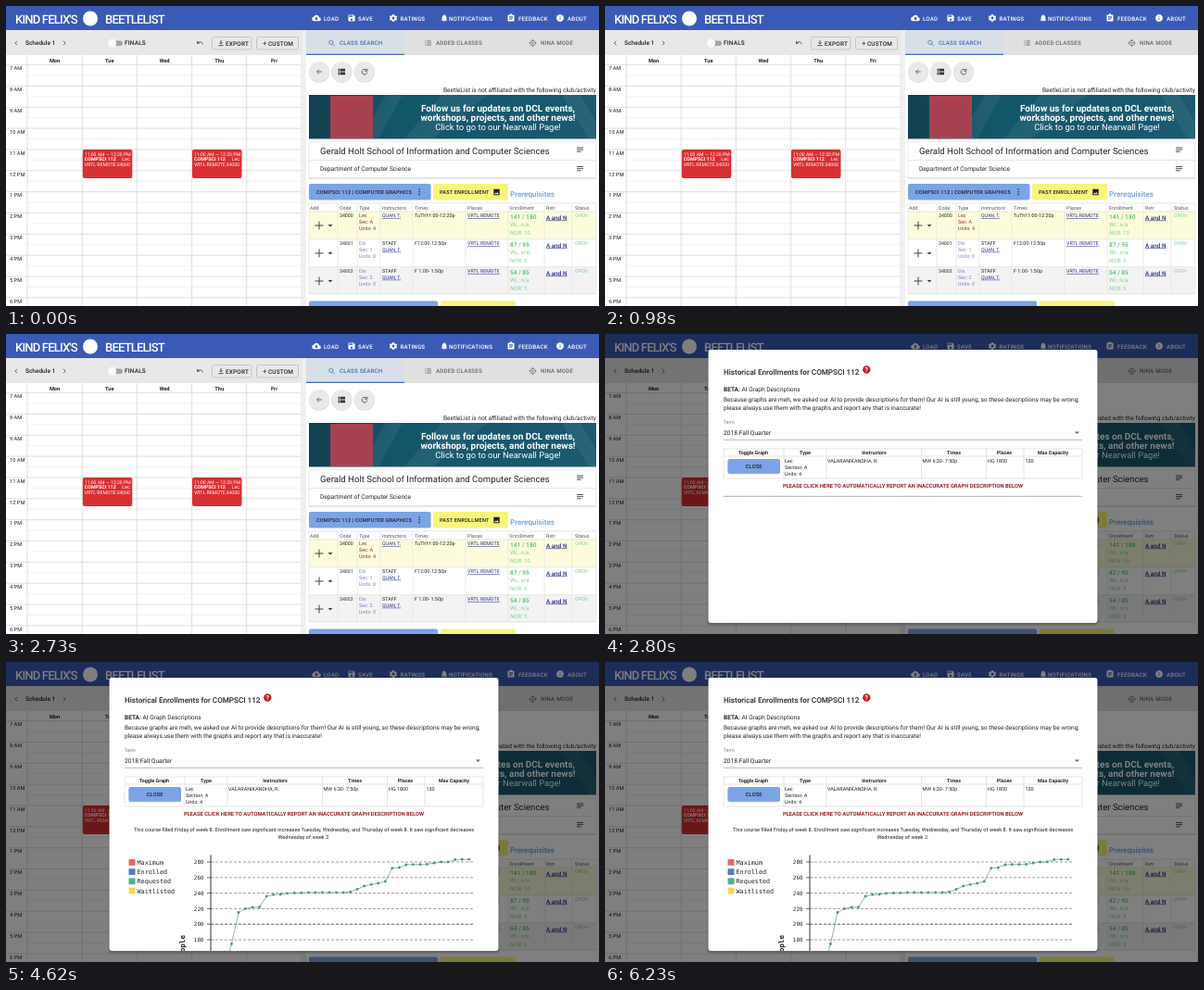
An HTML page for the animation above (6.3 s loop, 640 by 324 pixels).

```html
<!DOCTYPE html>
<html lang="en">
<head>
<meta charset="utf-8">
<title>Course planner</title>
<style>
  html, body { margin: 0; width: 100%; height: 100%; overflow: hidden; background: #fff; }
  svg { display: block; width: 640px; height: 324px; }
  text { font-family: Roboto, sans-serif; text-rendering: geometricPrecision; white-space: pre; }
  .mono { font-family: "DejaVu Sans Mono", monospace; }
  .caps { font-weight: 500; letter-spacing: .02857em; }
  .med { font-weight: 500; }
  .bold { font-weight: 700; }
  .link { text-decoration: underline; }
  .mid { text-anchor: middle; }
  .end { text-anchor: end; }
</style>
</head>
<body>
<svg id="stage" viewBox="0 0 640 324"></svg>
<script>
const INK = '#222', BLUE = '#7ba3e7', YELLOW = '#f8f57c', GREEN = '#7dd38d';
// The page cuts to the dialog, then the request ends and the chart replaces the rule
const LOOP = 6300, OPEN = 2790, STATUS_ON = 3000, CHART = 3560, STATUS_OFF = 3740;

const text = (x, y, s, size, fill = INK, cls = '') =>
  `<text x="${x}" y="${y}" font-size="${size}" fill="${fill}" class="${cls}">${s}</text>`;
const box = (x, y, w, h, fill, extra = '') =>
  `<rect x="${x}" y="${y}" width="${w}" height="${h}" fill="${fill}" ${extra}/>`;
const line = (x1, y1, x2, y2, color, w = 1, extra = '') =>
  `<path d="M${x1} ${y1}L${x2} ${y2}" stroke="${color}" stroke-width="${w}" ${extra}/>`;
const dot = (x, y, r, fill) => `<circle cx="${x}" cy="${y}" r="${r}" fill="${fill}"/>`;
// Icon on a 24 unit grid, centred on x, y
const icon = (x, y, size, d, fill, stroke = 'none') =>
  `<path transform="translate(${x - size / 2} ${y - size / 2}) scale(${size / 24})" d="${d}"
    fill="${fill}" fill-rule="evenodd" stroke="${stroke}" stroke-width="2.4"/>`;
const list = (items, draw) => items.map(draw).join('');

const ICONS = {
  cloud: 'M19.4 10A7.5 7.5 0 0 0 5.4 8A6 6 0 0 0 6 20H19A5 5 0 0 0 19.4 10zM17 13l-5 5-5-5h3V9h4v4z',
  save: 'M17 3H5a2 2 0 0 0-2 2v14a2 2 0 0 0 2 2h14a2 2 0 0 0 2-2V7zM12 13a3 3 0 1 0 .01 0zM5 5h10v4H5z',
  gear: 'M9.500 2h5l.6 3 2 1.200 2.900-1 2.500 4.300-2.300 2v1l2.300 2-2.500 4.300-2.900-1-2 1.200-.6 3h-5l-.6-3-2-1.200-2.900 1-2.500-4.300 2.300-2v-1l-2.300-2 2.500-4.300 2.900 1 2-1.200zM12 8.500a3.500 3.500 0 1 0 .01 0z',
  sheet: 'M5 3h4a3 3 0 0 1 6 0h4a2 2 0 0 1 2 2v14a2 2 0 0 1-2 2H5a2 2 0 0 1-2-2V5a2 2 0 0 1 2-2zM7 7h10v2H7zM7 11h10v2H7zM7 15h7v2H7z',
  bell: 'M10 20h4a2 2 0 0 1-4 0zM18 16v-5c0-3-1.6-5.6-4.5-6.3V4a1.5 1.5 0 0 0-3 0v.7C7.6 5.4 6 8 6 11v5l-2 2v1h16v-1z',
  info: 'M12 2a10 10 0 1 0 .01 0zM11 11h2v6h-2zM11 7h2v2h-2z',
  picture: 'M3 3h18v18H3zM5 18h14l-4.500-6-3.500 4.500-2.500-3z',
  rows: 'M3 4h18v7H3zM3 13h18v7H3zM6 6h3v3H6zM6 15h3v3H6z',
  search: 'M10 4a6 6 0 1 0 .01 0M14.500 14.500l6 6',
  bullets: 'M3 6h3M9 6h12M3 12h3M9 12h12M3 18h3M9 18h12',
  target: 'M12 4a8 8 0 1 0 .01 0M12 10a2 2 0 1 0 .01 0M12 1v3M12 20v3M1 12h3M20 12h3',
  back: 'M20 12H5M12 5l-7 7 7 7',
  refresh: 'M18 7a8 8 0 1 0 2 7M20 3v7h-7',
  undo: 'M4 8v6h6M4 14c5-6 13-5 16 3',
  download: 'M12 3v11M7 10l5 5 5-5M4 20h16',
  left: 'M15 6l-6 6 6 6', right: 'M9 6l6 6-6 6',
  lines: 'M2 5h20M2 11h20M2 17h13',
};

function header() {
  const items = [[335, 343, 'LOAD', 'cloud'], [373, 380, 'SAVE', 'save'], [418, 425.5, 'RATINGS', 'gear'],
    [473, 478, 'NOTIFICATIONS', 'bell'], [545, 553, 'FEEDBACK', 'sheet'], [598, 606, 'ABOUT', 'info']];
  const brand = (x, s) => `<g letter-spacing="-.8">${text(x, 18.5, s, 13, '#fff', 'med')}</g>`;
  return box(0, 0, 640, 26, '#3a5ab6') + brand(10, "KIND FELIX'S") + dot(91, 13.5, 8, '#fff') + brand(107, 'BEETLELIST') +
    list(items, ([ix, x, s, name]) => icon(ix, 13, 9.5, ICONS[name], '#fff') + text(x, 15.5, s, 6.2, '#fff', 'caps'));
}

function calendar() {
  const cols = [23, 82.2, 141.4, 200.6, 259.8, 319];
  const hourY = i => 63.6 + 22.85 * i;
  const event = x => box(x, 155, 53.5, 31, '#d82f33', 'rx="2"') +
    text(x + 2, 161.5, '11:00 AM — 12:20 PM', 5.1, '#fff') +
    text(x + 2, 167.3, 'COMPSCI 112', 5.3, '#fff', 'bold') + text(x + 51, 167.3, 'Lec', 5.3, '#fff', 'end') +
    text(x + 2, 172.8, 'VRTL REMOTE', 5.2, '#fff') + text(x + 51, 172.8, '34000', 5.2, '#fff', 'end');
  let out = box(0, 26, 320, 27, '#e8e8e8') +
    icon(11, 40, 9, ICONS.left, 'none', '#555') + text(21, 42.3, 'Schedule 1', 6.5, INK, 'med') +
    icon(63, 40, 9, ICONS.right, 'none', '#555') +
    box(111, 37.5, 15, 5.5, '#a5a5a5', 'rx="2.7"') + dot(114.5, 40.2, 4.6, '#fafafa') +
    text(128, 42.3, 'FINALS', 6.5, INK, 'caps') + icon(209.5, 39.5, 9, ICONS.undo, 'none', '#444') +
    box(222.5, 33.5, 42.5, 13.5, 'none', 'rx="2" stroke="#bbb" stroke-width=".8"') +
    icon(232, 40, 8, ICONS.download, 'none', '#333') + text(237, 42.5, 'EXPORT', 6.4, INK, 'caps') +
    box(270.5, 33.5, 45, 13.5, 'none', 'rx="2" stroke="#bbb" stroke-width=".8"') +
    text(277, 42.5, '+', 8, '#333') + text(283, 42.5, 'CUSTOM', 6.4, INK, 'caps');
  for (let i = 0; i < 12; i++) {
    const h = (i + 6) % 12 + 1;
    out += line(0, hourY(i), 319, hourY(i), '#dcdcdc', .9) + line(23, hourY(i) + 11.4, 319, hourY(i) + 11.4, '#f0f0f0', .9) +
      text(4, hourY(i) + 5.7, `${h} ${i < 5 ? 'AM' : 'PM'}`, 5.7);
  }
  out += list(cols, x => line(x, 53, x, 324, '#dcdcdc', .9));
  out += list(['Mon', 'Tue', 'Wed', 'Thu', 'Fri'], (d, i) => text(cols[i] + 29.6, 60.8, d, 5.7, INK, 'bold mid'));
  return out + event(82.8) + event(201);
}

function banner() {
  return box(327, 96, 310, 47.5, 'url(#teal)') +
    '<path d="M410 96h18l-26 47.500h-20zM470 96h50l-60 47.500h-30zM600 96h20l17 30v17.500h-8z" fill="#fff" opacity=".06"/>' +
    box(350, 97, 46, 46, '#a8414f') +
    list([['Follow us for updates on DCL events,', 113.5, 10, 'bold mid'], ['workshops, projects, and other news!', 123.5, 10, 'bold mid'],
      ['Click to go to our Nearwall Page!', 133.5, 9.4, 'mid']], ([s, y, size, cls]) => text(531, y, s, size, '#fff', cls));
}

function courseTable() {
  const heads = [[328, 'Add'], [360, 'Code'], [381, 'Type'], [406, 'Instructors'], [441, 'Times'], [498, 'Places'],
    [544, 'Enrollment'], [583, 'Rstr'], [614, 'Status']];
  const rows = [
    { y: 222, bg: '#fcfcdc', type: ['Lec', 'Sec: A', 'Units: 4'], tint: '#8c2f3c', time: 'TuTh11:00-12:20p', seats: '141 / 180', nor: 10 },
    { y: 252, bg: '#fff', type: ['Dis', 'Sec: 1', 'Units: 0'], tint: '#7f7fc4', time: 'F12:00-12:50p', seats: '87 / 95', nor: 5 },
    { y: 282, bg: '#f3f3f3', type: ['Dis', 'Sec: 2', 'Units: 0'], tint: '#7f7fc4', time: 'F 1:00- 1:50p', seats: '54 / 85', nor: 5 }];
  const row = ({ y, bg, type, tint, time, seats, nor }, i) => box(327, y, 310, 29.5, bg) +
    `<path d="M333.500 ${y + 15}h9M338 ${y + 10.5}v9" stroke="#444"/><path d="M347.500 ${y + 14}h5l-2.500 2.500z" fill="#444"/>` +
    text(360, y + 6.2, 34000 + i, 5.2) +
    list(type, (s, k) => text(381, y + 6.2 + 6.8 * k, s, 5.4, tint)) +
    (i ? text(406, y + 6.2, 'STAFF', 5.4) : '') +
    text(406, y + (i ? 12.7 : 6.2), 'QUAN, T.', 5.2, '#2a2f8c', 'link') +
    text(441, y + 6.2, time, 5.4) + text(498, y + 6.2, 'VRTL REMOTE', 5.35, '#2a2f8c', 'link') +
    text(544, y + 7.5, seats, 6.6, '#66c67a', 'bold') + text(544, y + 16.2, 'WL: n/a', 6, GREEN) +
    text(544, y + 25.3, 'NOR: ' + nor, 6, GREEN) +
    text(583, y + 8.5, 'A and N', 6.4, '#2a2f8c', 'link med') + text(614, y + 6.3, 'OPEN', 5.3, GREEN);
  return box(327, 213, 310, 9, '#fff') + list(heads, ([x, s]) => text(x, 219.5, s, 5.4, '#555')) + list(rows, row) +
    list([358, 379, 404, 439, 496, 542, 581, 611, 637, 327], x => line(x, 213, x, 311, '#e2e2e2', .7)) +
    list([213, 222, 251.7, 281.7, 311], y => line(327, y, 637, y, '#dedede', .7));
}

function search() {
  const tab = (ix, x, name, s, color) => icon(ix, 40, 8.5, ICONS[name], 'none', color) + text(x, 42.3, s, 6.2, color, 'caps');
  const card = (y, h) => box(327, y, 310, h, '#fff', 'stroke="#e6e6e6" stroke-width=".8"') + line(327, y + h, 637, y + h, '#d0d0d0', .9);
  return box(320, 26, 4, 298, '#f0f0f0') + box(324, 26, 316, 27, '#e0e0e0') + box(324, 26, 106, 27, '#d9dfe6') +
    box(324, 51.7, 106, 1.3, '#3f6fc0') +
    tab(351.5, 360, 'search', 'CLASS SEARCH', '#3f6fb5') + tab(455.5, 464, 'bullets', 'ADDED CLASSES', '#666') +
    tab(568.5, 577, 'target', 'NINA MODE', '#666') +
    list([338, 362.3, 387], x => dot(x, 71.6, 11.2, '#dadada') + dot(x, 71, 11, '#e9e9e9')) +
    icon(338, 71, 8.5, ICONS.back, 'none', '#555') + icon(362.3, 71, 10, ICONS.rows, '#333') +
    icon(387, 71, 8.5, ICONS.refresh, 'none', '#444') +
    text(637, 93, 'BeetleList is not affiliated with the following club/activity', 6.6, INK, 'end') + banner() +
    card(147, 19.5) + card(166.5, 19.5) +
    text(339, 160, 'Gerald Holt School of Information and Computer Sciences', 9.64) +
    text(339, 178.3, 'Department of Computer Science', 6.62) +
    icon(619.6, 155.5, 8.5, ICONS.lines, 'none', '#333') + icon(619.6, 176, 8.5, ICONS.lines, 'none', '#333') +
    box(327, 192, 131.5, 17.5, BLUE, 'rx="2"') + text(335, 203, 'COMPSCI 112 | COMPUTER GRAPHICS', 5.6, INK, 'caps') +
    list([198, 200.8, 203.6], y => dot(446, y, .8, INK)) +
    box(461, 192, 81, 17.5, YELLOW, 'rx="2"') + text(468, 203, 'PAST ENROLLMENT', 5.65, INK, 'caps') +
    icon(529.5, 201, 8.5, ICONS.picture, INK) + text(544, 206, 'Prerequisites', 8.1, '#6f9be0', 'med') +
    courseTable() +
    box(327, 318.5, 139, 8, BLUE, 'rx="2"') + box(469, 318.5, 81, 8, YELLOW, 'rx="2"');
}

function dialog() {
  const heads = [[160, 'Toggle Graph'], [216, 'Type'], [290.5, 'Instructors'], [376.5, 'Times'], [431, 'Places'], [483.5, 'Max Capacity']];
  const cells = [[194, 'Lec'], [240, 'VALARANIKANDHA, R.'], [342.5, 'MW 6:30- 7:50p'], [413, 'HG 1800'], [453.5, '130']];
  return box(0, 0, 640, 324, '#000', 'opacity=".5"') +
    box(110.5, 17.5, 422, 297, '#000', 'rx="4" opacity=".2"') + box(111.5, 17, 420, 295, '#fff', 'rx="3"') +
    text(128, 44, 'Historical Enrollments for COMPSCI 112', 8.15, INK, 'med') +
    dot(282.3, 38.5, 4.2, '#bd2226') + text(282.3, 41, '?', 7, '#fff', 'bold mid') +
    text(128, 62, '<tspan class="bold">BETA:</tspan> AI Graph Descriptions', 6.55) +
    text(128, 72.5, 'Because graphs are meh, we asked our AI to provide descriptions for them! Our AI is still young, so these descriptions may be wrong;', 6.55) +
    text(128, 81.5, 'please always use them with the graphs and report any that is inaccurate!', 6.55) +
    text(128, 97, 'Term', 5.1, '#777') + text(128, 109, '2018 Fall Quarter', 6.7) +
    line(128, 114.3, 515, 114.3, '#999', .7) + '<path d="M507 105.500h5l-2.500 2.500z" fill="#666"/>' +
    list([124, 132, 156], y => line(128, y, 515, y, '#d8d8d8', .7)) +
    list([128, 193, 239, 341.5, 411.5, 452, 515], x => line(x, 124, x, 156, '#d8d8d8', .7)) +
    list(heads, ([x, s]) => text(x, 130, s, 5.4, INK, 'bold mid')) +
    list(cells, ([x, s]) => text(x, 138.7, s, 5.45)) +
    text(194, 146, 'Section: A', 5.45) + text(194, 153, 'Units: 4', 5.45) +
    box(132.5, 135.7, 56.5, 15.5, '#bbb', 'rx="2"') + box(132.5, 135, 56.5, 15.5, BLUE, 'rx="2"') +
    text(160.7, 144.8, 'CLOSE', 5.7, INK, 'caps mid') +
    text(321.5, 165.5, 'PLEASE CLICK HERE TO AUTOMATICALLY REPORT AN INACCURATE GRAPH DESCRIPTION BELOW', 5.8, '#9c1c26', 'bold mid') +
    `<g id="rule">${line(128, 175.3, 515, 175.3, '#555', .7, 'stroke-dasharray="1 .5"')}</g>`;
}

function chart() {
  const legend = [['Maximum', '#e06c6c'], ['Enrolled', '#5b7bc0'], ['Requested', '#58a993'], ['Waitlisted', '#ffd25e']];
  const heights = [304.5, 270.5, 266.5, 265, 264.7, 253, 251.3, 251, 249.8, 249.5, 249.3, 249, 249, 249, 249, 249, 249, 248.3,
    245.5, 242, 240.3, 239, 237, 222.7, 222, 219, 218.7, 218.7, 218.5, 217.2, 216, 215.8, 213.5, 213.2, 213.2];
  const points = heights.map((y, i) => [243.4 + 7.54 * i, y]);
  const tickY = i => 216 + 16.8 * i;
  return text(321.5, 183, 'This course filled Friday of week 8. Enrollment saw significant increases Tuesday, Wednesday, and Thursday of week 8. It saw significant decreases', 5.65, INK, 'mid') +
    text(321.5, 190.5, 'Wednesday of week 2.', 5.65, INK, 'mid') +
    list(legend, ([s, color], i) => box(132.5, 213 + 10.2 * i, 7, 6.8, color) + text(141.5, 219 + 10.2 * i, s, 6.75, INK, 'mono')) +
    list([0, 1, 2, 3, 4, 5], i => text(213.5, tickY(i) + 2.1, 280 - 20 * i, 5.9, INK, 'mono end') +
      line(217, tickY(i), 221, tickY(i), '#444', .8) +
      line(221, tickY(i), 504, tickY(i), i === 4 ? '#444' : '#909090', .9, 'stroke-dasharray="3 2"')) +
    line(221, 208.5, 221, 312, '#333') +
    `<g transform="translate(192.500 295) rotate(-90)">${text(0, 0, 'Number of People', 7.6, INK, 'mono bold end')}</g>` +
    `<path d="M236 330L${points.join(' ')}" fill="none" stroke="#8aa79d" stroke-width=".9"/>` +
    list(points, ([x, y]) => dot(x, y, 1.4, '#43997f'));
}

const status = () => box(-3, 317, 217, 10, '#b5b6b9', 'rx="2"') +
  text(1, 323, 'Waiting for fanrn93vye.execute-api.us-west-1.amazonaws.com...', 6.9, '#505050');

document.getElementById('stage').innerHTML = `
  <defs>
    <linearGradient id="teal"><stop stop-color="#123f50"/><stop offset=".3" stop-color="#13566a"/><stop offset="1" stop-color="#1b5a70"/></linearGradient>
    <clipPath id="paper">${box(111.5, 17, 420, 295, '#000', 'rx="3"')}</clipPath>
  </defs>
  ${calendar()}${search()}${header()}
  <g id="dialog">${dialog()}<g id="chart" clip-path="url(#paper)">${chart()}</g></g>
  <g id="status">${status()}</g>`;

const show = (id, on) => { document.getElementById(id).style.display = on ? '' : 'none'; };
const start = performance.now();

function frame() {
  const t = (performance.now() - start) % LOOP;
  show('dialog', t >= OPEN);
  show('rule', t < CHART);
  show('chart', t >= CHART);
  show('status', t >= STATUS_ON && t < STATUS_OFF);
  requestAnimationFrame(frame);
}
frame();
</script>
</body>
</html>
```
